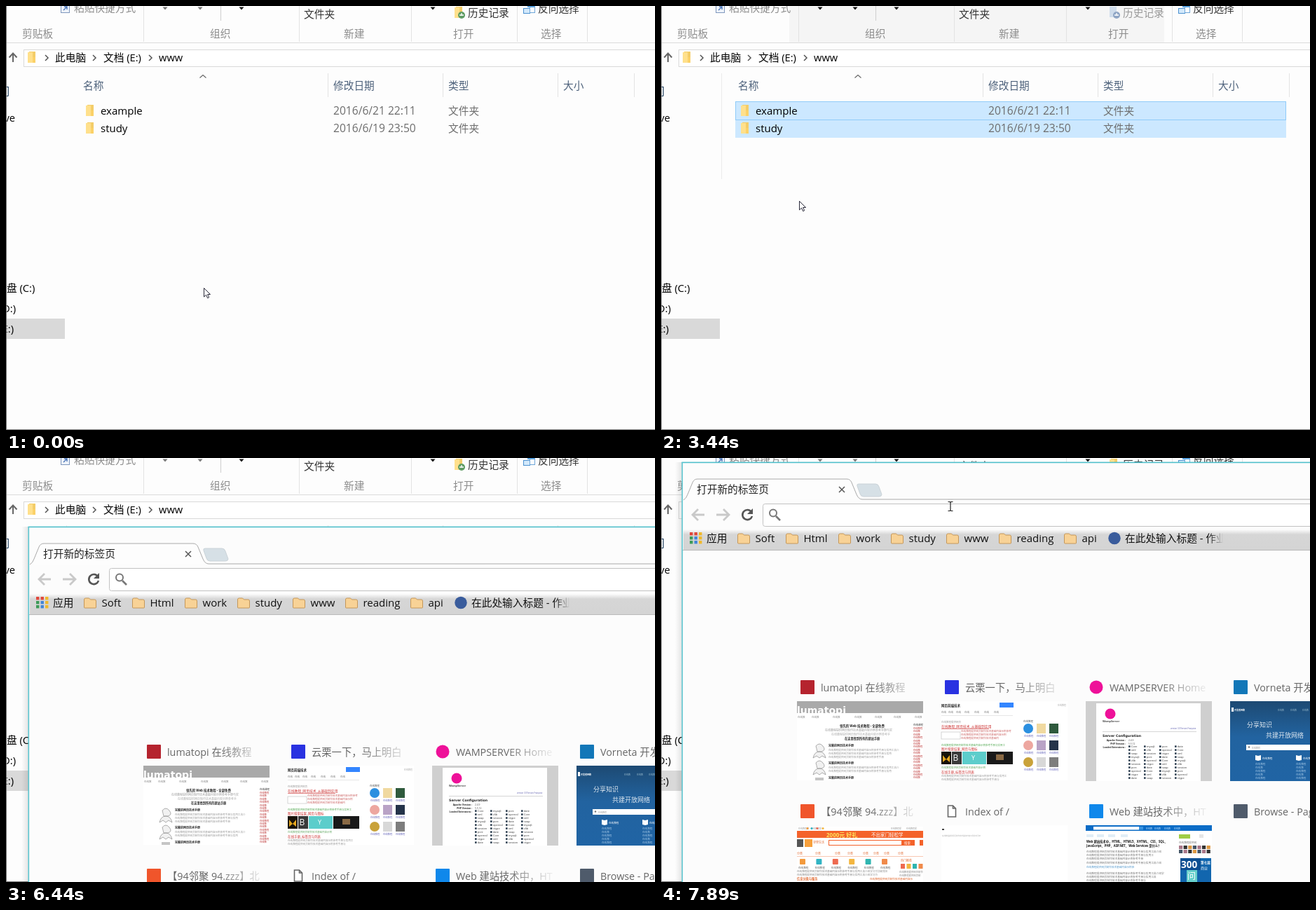
These frames come from a looping animation (926 by 605 pixels, 8000 ms). An HTML page:

```html
<!DOCTYPE html>
<html lang="zh-CN">
<head>
<meta charset="utf-8">
<title>文件夹与浏览器</title>
<style>
  html, body { margin: 0; width: 100%; height: 100%; overflow: hidden; background: #fdfdfd; }
  svg { display: block; width: 926px; height: 605px; }
  text { font-family: "Open Sans", "Noto Sans CJK SC", "Noto Sans CJK", sans-serif; }
  .mono { font-family: "DejaVu Sans", "Noto Sans CJK SC", sans-serif; }
</style>
</head>
<body>
<svg id="stage" viewBox="0 0 926 605" lang="zh-CN">
  <defs>
    <linearGradient id="fade"><stop stop-color="#fcfcfc" stop-opacity="0"/><stop offset="1" stop-color="#fcfcfc"/></linearGradient>
    <linearGradient id="ink"><stop offset=".82" stop-color="#111"/><stop offset=".97" stop-color="#111" stop-opacity="0"/></linearGradient>
    <linearGradient id="shade"><stop stop-color="#000" stop-opacity="0"/><stop offset="1" stop-color="#000" stop-opacity=".1"/></linearGradient>
    <linearGradient id="bar" x2="0" y2="1"><stop stop-color="#fcfcfc"/><stop offset=".25" stop-color="#d6d6d6"/><stop offset="1" stop-color="#d4d4d4"/></linearGradient>
    <linearGradient id="sea" x2="0" y2="1"><stop stop-color="#1d4a73"/><stop offset=".45" stop-color="#2263a0"/><stop offset="1" stop-color="#2064a4"/></linearGradient>
  </defs>
</svg>
<script>
const SIZE = 14.7;
const T = (x, y, s, fill = '#000', size = SIZE, extra = '') =>
  `<text x="${x}" y="${y}" fill="${fill}" font-size="${size}" ${extra}>${s}</text>`;
const R = (x, y, w, h, fill, extra = '') =>
  `<rect x="${x}" y="${y}" width="${w}" height="${h}" fill="${fill}" ${extra}/>`;
const P = (d, stroke, width = 1, fill = 'none') =>
  `<path d="${d}" stroke="${stroke}" stroke-width="${width}" fill="${fill}"/>`;
const C = (x, y, r, fill) => `<circle cx="${x}" cy="${y}" r="${r}" fill="${fill}"/>`;
const G = (id, body) => `<g id="${id}">${body}</g>`;
const each = (list, draw) => list.map(draw).join('');
const range = n => [...Array(n).keys()];
const BOLD = 'font-weight="bold"';

const FILLER = '在线教程提供网页制作技术基础内容示例参考手册与实用工具介绍学习方法和常见问题说明';
const filler = (x, y, w, fill = '#777', size = 4) =>
  T(x, y, FILLER.repeat(2).slice(0, Math.round(w / size)), fill, size);
const paragraph = (x, y, w, rows, step, fill, size) =>
  each(range(rows), i => filler(x, y + i * step, w * (1 - (i % 3) * .12), fill, size));

// File manager
const folder = (x, y) =>
  R(x + 2, y, 9, 14, '#f3cd69') + R(x, y + 1, 7, 15, '#ffe08c') + R(x + 7, y + 8, 4, 8, '#fbd168');
const caret = (x, fill) => P(`M${x - 3.5} 1.5h7l-3.5 4z`, 'none', 0, fill);
const chevron = x => P(`M${x - 2} 70l4 4-4 4`, '#555', 1.5);
const vline = (x, y, h, fill = '#e3e3e3') => R(x, y, 1, h, fill);

function ribbon() {
  const labels = [[23, '剪贴板'], [291, '组织'], [482, '新建'], [638, '打开'], [763, '选择']];
  return G('tint', R(183, 0, 535, 52, '#f5f5f5')) +
    each([196, 418, 578, 729, 829], x => vline(x, 0, 51)) + vline(306, 0, 21, '#cfcfcf') +
    each(labels, ([x, s]) => T(x, 45, s, '#8c8c8c')) +
    R(78.5, -4.5, 12, 14, '#eef3fa', 'stroke="#7f97bd"') + P('M82 6l5-5m-4 0h4v4', '#4a74b8', 1.4) +
    T(97, 8, '粘贴快捷方式', '#8c8c8c') + T(425, 17, '文件夹', '#333') +
    G('soft', caret(227, '#777') + caret(277, '#777')) +
    G('dark', caret(227, '#111') + caret(277, '#111')) +
    caret(336, '#111') + caret(609, '#111') +
    G('history', folder(640, 1) + C(650, 13, 5, '#5f9c63') + P('M647 13h6m-3-3v4', '#fff', 1.3) + T(659, 15, '历史记录', '#333')) +
    G('historyOff', R(640, 1, 10, 15, '#cfdceb') + C(650, 13, 5, '#8fa5c4') + P('M647 13h6m-3-3v4', '#fff', 1.3) + T(659, 15, '历史记录', '#999')) +
    R(738.5, 3.5, 9, 7, '#d3e9fb', 'stroke="#4a90d0"') + R(747.5, -2.5, 7, 12, '#fff', 'stroke="#6ea6d8"') +
    R(744, -2, 10, 4, '#5ba3e0') + T(759, 8.5, '反向选择', '#333') +
    R(0, 52, 926, 1, '#dcdcdc');
}

function address() {
  return P('M10 80V68M4.5 73.5l5.5-6 5.5 6', '#666', 2) +
    G('crumbs', R(25.5, 62.5, 920, 24, '#fff', 'stroke="#d9d9d9"') + folder(31, 65) +
      each([58, 126, 206], chevron) + T(70, 79, '此电脑') + T(139, 79, '文档 (E:)') + T(218, 79, 'www')) +
    G('edit', R(26.5, 62.5, 920, 24, '#fff', 'stroke="#2b8ad6" stroke-width="1.4"') + folder(32, 66) +
      R(52, 65, 52, 19, '#3399ff') + T(52, 80, 'E:\\www', '#fff'));
}

function files() {
  const heads = [[110, '名称'], [467, '修改日期'], [631, '类型'], [795, '大小']];
  const rows = [['example', '2016/6/21 22:11', 155], ['study', '2016/6/19 23:50', 180]];
  return R(0, 446, 84, 29, '#d9d9d9') +
    T(-9.5, 127, '问', '#1a3a5a') + T(13, 165, 've', '#000', SIZE, 'text-anchor="end"') +
    T(1, 408, '盘 (C:)') + T(14, 437, '(D:)', '#000', SIZE, 'text-anchor="end"') +
    T(11, 466, '(E:)', '#000', SIZE, 'text-anchor="end"') +
    G('divider', vline(86, 96, 151, '#ebebeb')) +
    each(heads, ([x, s]) => T(x, 119, s, '#4c607a')) +
    each([459, 623, 787, 896], x => vline(x, 96, 34)) +
    P('M276.5 102.5l4.5-4 4.5 4', '#666', 1.1) +
    G('picked', R(106, 163, 786, 25, '#cce8ff') + R(106.5, 136.5, 785, 26, '#cce8ff', 'stroke="#8fcbf9"')) +
    each(rows, ([name, date, y]) => folder(114, y - 14) + T(135, y, name, '#000', 15) +
      T(467, y, date, '#6d6d6d', 15.6) + T(631, y, '文件夹', '#6d6d6d'));
}

// Browser
function tabs() {
  return P('M34 129Q38 127 40 121L47 104Q49 99 54 99H267Q272 99 274 104L281 121Q284 128 289 128H990', '#aaa', 1, '#fdfdfd') +
    T(53, 119, '打开新的标签页', '#222') + P('M256 110l8 8m0-8l-8 8', '#555', 1.5) +
    P('M284 106h24q4 0 5 4l4 11q0 3-4 3h-22q-4 0-5-4l-4-11q-1-3 2-3z', '#cbd3d8', 1, '#d6e0e6') +
    P('M64 150H48M55 142l-8 8 8 8', '#c9c9c9', 2.8) + P('M81 150h17M91 142l8 8-8 8', '#c9c9c9', 2.8) +
    P('M131 146a7 7 0 1 0 1 6', '#555', 2.6) + P('M133 141v8h-8z', 'none', 0, '#555') +
    R(147.5, 134.5, 820, 32, '#fff', 'rx="3" stroke="#c2c2c2"') +
    P('M166 152l6 6', '#777', 2.6) + P('M157 147.5a5 5 0 1 0 10 0a5 5 0 1 0-10 0', '#777', 2);
}

function bookmarks() {
  const colors = ['#e0483c', '#e0483c', '#f0b92b', '#3d9b58', '#4285d8', '#f0b92b', '#3d9b58', '#4285d8', '#f0b92b'];
  const marks = [[111, 'Soft'], [180, 'Html'], [255, 'work'], [330, 'study'], [409, 'www'], [484, 'reading'], [577, 'api']];
  return R(34, 171, 940, 29, 'url(#bar)') + R(33, 200, 940, 1, '#b9b9b9') +
    each(colors, (c, i) => R(43 + i % 3 * 6.5, 175 + (i / 3 | 0) * 6, 4.4, 4.4, c)) +
    T(67, 189, '应用', '#111') +
    each(marks, ([x, s]) => P(`M${x + .5} 190V179q0-2 2-2h5l2 2h6q2 0 2 2v9q0 1-1 1h-15q-1 0-1-1z`, '#c4975a', 1, '#f8d296') +
      T(x + 25.5, 189, s, '#111', 15)) +
    C(649, 183.5, 8.7, '#3a5c9c') + T(664, 189, '在此处输入标题 - 作业', 'url(#ink)');
}

const square = fill => (x, y) => R(x - 10, y - 10, 20, 20, fill, 'rx="1"');
const disc = fill => (x, y) => C(x, y, 9.5, fill);
const sheet = (x, y) => P(`M${x - 5.5} ${y - 8}h7l4 4v12h-11zM${x + 1.5} ${y - 8}v4h4`, '#666', 1.6, '#fff');

function lessonTile() {
  const sketch = y => P(`M223 ${y}q5-6 10 0t-2 8h-6t-2-8M219 ${y + 17}q2-9 9-9t9 9l-5-3-4 3-4-3z`, '#999', .8, '#f1f1f1');
  return R(196, 416, 180, 113, '#fff') + R(196, 416, 180, 17, '#a9a9a9') +
    T(196, 434, 'lumatopi', '#fff', 14, BOLD + ' class="mono"') + R(196, 433.5, 180, 4, '#fff') +
    each([197, 217, 247, 278, 307, 334, 364], x => filler(x, 440, 12, '#888', 3.5)) +
    T(257, 453, '领先的 Web 技术教程 - 全部免费', '#222', 4.4, BOLD) +
    filler(236, 459, 96, '#999') + T(264, 471, '在这里找到所有的建站手册', '#222', 4.2, BOLD) + filler(245, 465, 84, '#aaa') +
    sketch(480) + sketch(504) + R(222, 525, 12, 4, '#c5c5c5') +
    each([481, 506, 527], y => T(241, y, '完整的网页技术手册', '#222', 4, BOLD)) +
    paragraph(241, 487, 102, 3, 5, '#999', 3.6) + paragraph(241, 512, 102, 2, 5, '#999', 3.6) +
    T(362, 451, '在线课程', '#333', 3.5) +
    each(range(17), i => filler(362, 456 + i * 4.4, 13 - i % 3 * 2, '#b33', 3.3));
}

function searchTile() {
  const icons = ['#2b8fe0', '#f0d9a0', '#2f5a3d', '#eda7a0', '#b9a3c6', '#25344a', '#c9a23a', '#d8d8d8', '#7d7d7d'];
  return R(402, 416, 180, 113, '#fff') +
    T(402, 424, '网页前端技术', '#222', 4.5, BOLD) + R(485, 418, 20, 7, '#3385ff') + filler(568, 423, 12, '#aaa', 3) +
    each([402, 412, 423, 435, 449, 463, 477], x => filler(x, 433, 7, '#777', 3.5)) + R(402, 436, 102, .7, '#ddd') +
    filler(402, 447, 28, '#999', 3.5) + T(402, 454, '在线教程_网页技术_从基础到实用', '#c33', 4.8) + R(402, 455, 68, .6, '#c33') +
    paragraph(430, 460, 72, 3, 5, '#c66', 3.6) + R(402, 460, 27, 10, '#fff', 'stroke="#bbb" stroke-width=".6"') +
    filler(402, 480, 90, '#5a5', 3.5) + T(402, 486, '图片搜索结果_网页与图标', '#c33', 4.5) +
    R(402, 488, 14, 18, '#171208') + P('M409 499l-5-6v10zM409 499l5-6v10z', 'none', 0, '#e3a51d') +
    R(417, 488, 14, 18, '#3a3a3a') + T(418.5, 501, 'B', '#fff', 12) +
    R(432, 488, 34, 18, '#5ccdcb') + T(445, 500, 'Y', '#fff', 9) + R(467, 488, 37, 18, '#191919') + R(480, 492, 11, 8, '#8a6a45') +
    filler(402, 512, 62, '#6a6', 3.5) + T(402, 519, '在线手册_标签页与列表', '#c33', 4.5) + paragraph(402, 524, 95, 2, 4.5, '#999', 3.6) +
    filler(519, 446, 13, '#555', 3.5) +
    each(icons, (c, i) => {
      const x = 519 + i % 3 * 18, y = 448 + (i / 3 | 0) * 24;
      return (i % 3 ? R(x + 1, y, 13, 14, c) : C(x + 7, y + 7, 7, c)) + filler(x + 1, y + 19, 12, '#66b', 3.3);
    });
}

function serverTile() {
  const names = ['Core', 'date', 'ctype', 'openssl', 'pcre', 'session', 'zlib', 'mysqli', 'soap', 'xml'];
  return R(608, 416, 180, 114, '#cfcfcf') + R(623, 419, 149, 111, '#fff') +
    C(643, 434, 7.5, '#ee1199') + T(632, 446, 'WampServer', '#444', 3.8, BOLD) +
    T(729, 456, 'version 3.0 Version Française', '#55a', 2.7) + R(632, 459, 134, .6, '#bbb') +
    T(632, 467, 'Server Configuration', '#222', 4.7, BOLD + ' class="mono"') +
    each([['Apache Version :', '2.4.9'], ['PHP Version :', '5.5.12'], ['Loaded Extensions :', '']], ([a, b], i) =>
      T(665, 473 + i * 5, a, '#222', 3.3, 'text-anchor="end" font-weight="bold"') + T(669, 473 + i * 5, b, '#444', 3.3)) +
    each(range(40), i => {
      const x = 669 + i % 4 * 22, y = 482 + (i / 4 | 0) * 5;
      return R(x, y - 2.7, 2.6, 2.6, '#345') + T(x + 4, y, names[(i * 7 + (i / 4 | 0)) % 10], '#333', 3.8);
    });
}

function docsTile() {
  return R(814, 416, 180, 114, 'url(#sea)') + R(816, 425, 3, 6, '#fff') + T(820, 430, '开发者网络', '#fff', 3, BOLD) +
    each([882, 900, 917], x => filler(x, 430, 10, '#9bc', 3)) +
    T(838, 453, '分享知识', '#dfe8f0', 9) + T(865, 468, '共建开放网络', '#dfe8f0', 9) +
    R(837, 478, 120, 8, '#fff') + C(841, 481.5, 1.2, '#777') + filler(845, 484, 12, '#999', 3) +
    each([850, 908], x => P(`M${x} 493l4 1 4-1v7l-4 1-4-1z`, 'none', 0, '#fff') + filler(x + 10, 499, 13, '#fff', 3.6) +
      each(range(5), i => filler(x, 507 + i * 5, 16 - i % 2 * 5, '#9fc4e4', 3.6)));
}

function townTile() {
  const colors = ['#f39a3c', '#31b4c4', '#ee6a50', '#f3b640', '#2fb5b0', '#f08a4a'];
  return R(196, 595, 180, 90, '#fff') + each([198, 216, 330, 352], x => filler(x, 599, 14, '#999', 3)) +
    each([211, 217, 225, 233], (x, i) => C(x, 597.5, 1.6, colors[i])) +
    R(196, 601, 180, 10, '#f4622a') + T(238, 610, '2000元 好礼', '#ffe45c', 8, BOLD) + T(302, 609, '不出家门轻松学', '#fff', 6.5) +
    R(196, 613, 9, 11, '#555') + R(207, 613, 11, 11, '#f7a03c') + T(219, 619, '邻里生活', '#e0662c', 4) +
    R(241.5, 614.5, 104, 7, '#fff', 'stroke="#f4622a"') + R(345, 614, 19, 8, '#f4622a') + T(349, 620, '搜索', '#fff', 4.5) + R(371, 614, 5, 8, '#f4622a') +
    each([196, 222, 250, 268, 290, 305, 320, 340], x => T(x, 635, '分类', '#e0662c', 4)) + R(196, 637, 180, .6, '#f4a27f') +
    each(colors, (c, i) => R(200 + i * 23.4, 641, 8, 8, c, 'rx="1"') + filler(198 + i * 23.4, 655, 14, '#666', 3.6)) +
    paragraph(196, 660, 130, 2, 5, '#888', 3.6) + T(344, 645, '热门推荐', '#e0662c', 4) +
    each(range(4), i => R(344 + i * 8.5, 648, 6, 7, colors[(i + 2) % 6])) + paragraph(342, 661, 34, 2, 5, '#888', 3.4) +
    T(196, 671, '信息分类与服务', '#e0662c', 4.2, BOLD) + filler(300, 671, 60, '#e0662c', 3.6);
}

function indexTile() {
  return R(402, 593, 180, 100, '#fff') + R(403, 598, 3, 2, '#444') + filler(403, 609, 56, '#aaa', 2.5);
}

function answerTile() {
  return R(608, 593, 180, 100, '#fff') + R(608, 593, 180, 8, '#0c6cc6') + R(619, 595, 65, 4.5, '#fff') + R(684, 595, 6, 4.5, '#3a93e0') +
    each([694, 706, 720, 734], x => filler(x, 599, 8, '#bfe0ff', 3)) +
    each([609, 624, 640, 658], x => R(x, 606, 10, 4, '#e1edf6')) +
    T(609, 618, 'Web 建站技术中，HTML、HTML5、XHTML、CSS、SQL、', '#111', 4.3, BOLD) +
    T(609, 624, 'JavaScript、PHP、ASP.NET、Web Services 是什么？', '#111', 4.3, BOLD) +
    paragraph(609, 632, 108, 4, 5.2, '#777', 3.7) + filler(609, 654, 70, '#59c', 3.6) + paragraph(609, 663, 112, 3, 5, '#777', 3.7) +
    R(741, 606, 16, 6, '#9fcd46') + R(770, 606, 6, 5, '#e5e5e5') + filler(741, 619, 26, '#777', 3.6) +
    each(range(14), i => R(741 + i % 7 * 6.6, 622 + (i / 7 | 0) * 6, 5.2, 5, ['#a78', '#456', '#d94', '#333'][i * 3 % 4])) +
    R(743, 640, 44, 40, '#1266ae') + P('M743 640h29v17h-29z', 'none', 0, '#0d4f92') + T(744, 654, '300', '#fff', 13.5, BOLD) +
    R(752, 657, 15, 17, '#66cfcb') + T(753, 670, '问', '#fff', 12) + T(772, 648, '第七届', '#fff', 4.6, BOLD) + T(772, 656, '商业', '#fff', 5);
}

function tiles() {
  const items = [
    ['lumatopi 在线教程', square('#b5232e'), lessonTile], ['云栗一下，马上明白', square('#2932e1'), searchTile],
    ['WAMPSERVER Home', disc('#ee1199'), serverTile], ['Vorneta 开发者网络', square('#1277b8'), docsTile],
    ['【94邻聚 94.zzz】北', square('#f0552b'), townTile], ['Index of /', sheet, indexTile],
    ['Web 建站技术中，HT', square('#0f88eb'), answerTile], ['Browse - Page list', square('#4f5b6b'), () => '']
  ];
  return each(items, ([title, icon, thumb], i) => {
    const x = 196 + i % 4 * 206, y = i < 4 ? 396 : 573;
    return T(x + 34, y + 5.5, title, '#666', 14.3) + R(x + 105, y - 12, 74, 24, 'url(#fade)') +
      R(x + 178, y - 12, 28, 24, '#fcfcfc') + icon(x + 15, y) + thumb();
  });
}

function browser() {
  return R(22, 75, 10, 700, 'url(#shade)') + R(32, 75, 980, 700, '#fcfcfc') +
    tabs() + bookmarks() + tiles() + R(31.5, 74.6, 980, 1.6, '#4fbfca') + R(31.5, 75, 1.6, 700, '#5cc5d0');
}

document.getElementById('stage').insertAdjacentHTML('beforeend',
  ribbon() + address() + files() + R(0, 0, 1, 605, '#777') + R(0, 604, 926, 1, '#777') +
  G('browser', browser()) +
  G('arrow', P('M.5.5V13l3-2.8 2.2 4.6 2-1-2.1-4.3H9.5z', '#2a2a3a', 1, '#fff')) +
  G('beam', P('M-3.5-6.5h2.5l1 1 1-1h2.5M0-6V6M-3.5 6.5h2.5l1-1 1 1h2.5', '#222', 1.2)));

// Motion: [time, x, y], each held until the next
const pointer = [
  [0, 282, 402], [120, 316, 366], [280, 349, 324], [550, 347, 300], [680, 343, 210], [810, 337, 92], [950, 335, 74],
  [1330, 333, 75], [1450, 328, 76], [1600, 280, 78], [1750, 190, 112], [1890, 90, 140], [2040, 28, 128],
  [2190, 90, 180], [2340, 200, 226], [2510, 237, 232], [2780, 220, 255], [2910, 160, 288], [3040, 110, 299],
  [3180, 89, 300], [3310, 150, 290], [3440, 197, 278], [3740, 220, 290], [3900, 300, 360], [4030, 400, 430],
  [4160, 470, 469], [4290, 496, 460], [4430, 503, 452], [4560, 503, 446], [5400, 503, 435], [5550, 400, 440],
  [5680, 220, 446], [5810, 37, 440], [6710, 440, 180], [6840, 486, 118], [6980, 488, 100], [7110, 484, 67],
  [7270, 478, 42], [7400, 470, 24], [7520, 464, 14], [7650, 460, 14], [7770, 440, 36], [7890, 413, 69]
];
const panel = [
  [6440, 32, 98], [6980, 32, 93], [7110, 32, 75], [7270, 29, 48], [7400, 26, 26],
  [7520, 23, 12], [7650, 25, 8], [7770, 28, 6], [7890, 30, 6]
];
const spans = {
  edit: [[950, 2630]],
  divider: [[2340, 8000]],
  picked: [[3310, 3740], [4430, 5400]],
  beam: [[810, 1750], [7890, 8000]],
  away: [[5940, 6710]],
  browser: [[6440, 8000]]
};
const LOOP = 8000;
const $ = id => document.getElementById(id);
const show = (id, on) => $(id).setAttribute('visibility', on ? 'visible' : 'hidden');
const move = (id, x, y) => $(id).setAttribute('transform', `translate(${x} ${y})`);
const held = (steps, t) => steps.findLast(s => s[0] <= t) || steps[0];
const within = (name, t) => spans[name].some(([a, b]) => t >= a && t < b);

function draw(t) {
  const edit = within('edit', t), picked = within('picked', t), beam = within('beam', t), away = within('away', t);
  show('edit', edit);
  show('crumbs', !edit);
  show('divider', within('divider', t));
  for (const id of ['picked', 'tint', 'dark', 'historyOff']) show(id, picked);
  for (const id of ['soft', 'history']) show(id, !picked);
  show('browser', within('browser', t));
  show('arrow', !beam && !away);
  show('beam', beam);
  const [, x, y] = held(pointer, t), [, left, top] = held(panel, t);
  move('arrow', x, y);
  move('beam', x, y);
  move('browser', left - 32, top - 75);
}

const start = performance.now();
function tick() {
  draw((performance.now() - start) % LOOP);
  requestAnimationFrame(tick);
}
tick();
</script>
</body>
</html>
```
